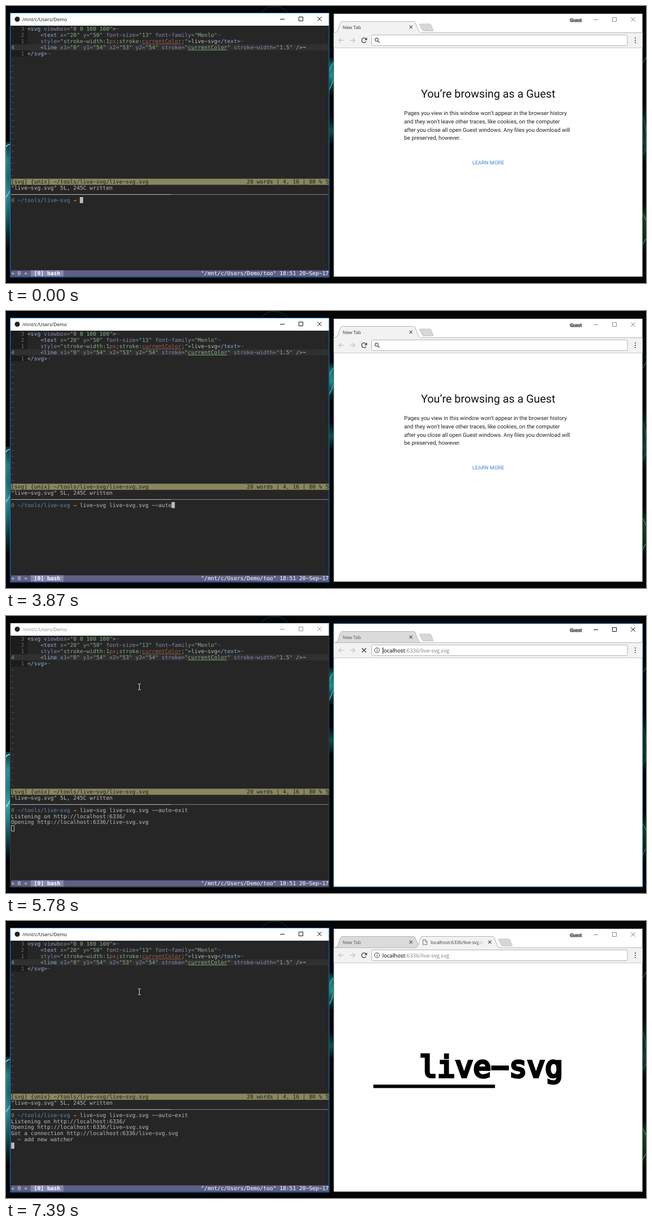
Recreate the animation shown at these times as an HTML page with a canvas. Size 1135x493 px, loop 8 s.

```html
<!DOCTYPE html>
<html lang="en">
<head>
<meta charset="utf-8">
<title>Terminal and browser</title>
<style>
html, body { margin: 0; width: 100%; height: 100%; overflow: hidden; background: #030506; }
canvas { display: block; }
</style>
</head>
<body>
<canvas id="stage" width="1135" height="493"></canvas>
<script>
const LOOP = 8000;
const ctx = document.getElementById('stage').getContext('2d');
const MONO = '"DejaVu Sans Mono", monospace';
const UI = '"Open Sans", sans-serif';
const ROBOTO = 'Roboto, sans-serif';
const WIDE_HYPHEN = '\u2212';

// ---------- drawing helpers ----------
function rect(x, y, w, h, color) {
  ctx.fillStyle = color;
  ctx.fillRect(x, y, w, h);
}
function label(text, x, y, font, color) {
  ctx.font = font;
  ctx.fillStyle = color;
  ctx.fillText(text, x, y);
}
function stroke(d, color, width = 1) {
  ctx.strokeStyle = color;
  ctx.lineWidth = width;
  ctx.stroke(new Path2D(d));
}
function shape(d, fill, line) {
  ctx.fillStyle = fill;
  ctx.fill(new Path2D(d));
  if (line) stroke(d, line);
}
function dot(x, y, r, color) {
  ctx.fillStyle = color;
  ctx.beginPath();
  ctx.arc(x, y, r, 0, 7);
  ctx.fill();
}
function arc(x, y, r, from, to, color, width) {
  ctx.strokeStyle = color;
  ctx.lineWidth = width;
  ctx.beginPath();
  ctx.arc(x, y, r, from, to);
  ctx.stroke();
}
function cross(x, y, r, color, width = 1) {
  stroke(`M${x - r} ${y - r}L${x + r} ${y + r}M${x + r} ${y - r}L${x - r} ${y + r}`, color, width);
}
function windowButtons(x, y, color) {
  stroke(`M${x - 4} ${y + .5}h8`, color);
  stroke(`M${x + 29.5} ${y - 3.5}h7v7h-7z`, color);
  cross(x + 66, y, 3.8, color);
}
function windowShadow(x, y, w, h, focused) {
  ctx.save();
  ctx.shadowColor = focused ? 'rgba(0,0,0,.6)' : 'rgba(0,0,0,.2)';
  ctx.shadowBlur = focused ? 14 : 6;
  ctx.shadowOffsetY = 2;
  rect(x, y, w, h, '#000');
  ctx.restore();
}

// ---------- desktop ----------
function verticalGlow(x, y, w, h, colors) {
  const glow = ctx.createLinearGradient(0, y, 0, y + h);
  colors.forEach((color, i) => glow.addColorStop(i / (colors.length - 1), color));
  rect(x, y, w, h, glow);
}
function drawWallpaper() {
  rect(0, 0, 1135, 493, '#030507');
  verticalGlow(0, 242, 8, 190, ['#0b3a41', '#2a929c', '#1f7d88', '#33a3ad', '#1c7580', '#0c3d45', '#04090b']);
  stroke('M-2 253Q4 244 10 247M-2 342Q5 335 10 322', '#8fe6ea', 2);
  stroke('M450 16Q462 -2 480 1T500 16', '#07262a', 1.5);
  verticalGlow(573, 92, 8, 66, ['#06201f', '#1f8f88', '#2bb3a8', '#0d4a47', '#04100f']);
  stroke('M570 130Q574 106 584 98M570 154Q578 142 584 120', '#45c9bd', 2);
  verticalGlow(573, 200, 8, 44, ['#04100f', '#14605a', '#04100f']);
  verticalGlow(1129, 170, 6, 110, ['#030507', '#0a2a18', '#12402a', '#030507']);
  stroke('M1127 105L1137 88M1127 190Q1133 205 1137 240M1127 270L1137 248', '#1d5a33', 1.5);
  verticalGlow(1129, 350, 6, 90, ['#030507', '#173f1a', '#0f2e14', '#030507']);
  stroke('M1127 365L1137 385M1127 430Q1133 415 1137 412', '#3f8a3f', 1.5);
}

// ---------- terminal ----------
const CELL = 5.807, ROW = 10.875, LEFT = 9, TOP = 35.5;
const FG = '#bcbcbc', BG = '#262626', TAG = '#8fafd7', ATTR = '#8787af', STR = '#87af87',
      RUST = '#a5624f', DIM = '#585858', INK = '#1c1c1c', OLIVE = '#87875f';
const colX = col => LEFT + col * CELL;
const rowY = row => TOP + row * ROW;

function cells(row, col, text, color, bold = '') {
  ctx.font = `${bold} 9.66px ${MONO}`;
  ctx.fillStyle = color;
  [...text.replaceAll('-', WIDE_HYPHEN)].forEach((ch, i) =>
    ctx.fillText(ch, colX(col + i), rowY(row) + 8.7));
}
function fillCells(row, col, count, color) {
  rect(colX(col), rowY(row), count * CELL, ROW, color);
}
function runs(row, col, parts) {
  for (const [color, text, underline] of parts) {
    cells(row, col, text, color);
    if (underline) rect(colX(col), rowY(row) + 10, text.length * CELL, .8, color);
    col += text.length;
  }
}
const attrs = text => text.split(/("[^"]*")/).map(s => [s[0] === '"' ? STR : ATTR, s]);

const CODE = [
  [[TAG, '<svg'], ...attrs(' viewbox="0 0 100 100"'), [TAG, '>'], [DIM, '¬']],
  [[TAG, '    <text'], ...attrs(' x="20" y="50" font-size="13" font-family="Menlo"'), [DIM, '¬']],
  [[ATTR, '    style='], [STR, '"stroke-width:1'], [RUST, 'px'], [STR, ';stroke:'],
   [RUST, 'currentColor', true], [STR, ';"'], [TAG, '>'], [FG, 'live-svg'], [TAG, '</text>'], [DIM, '¬']],
  [[TAG, '    <line'], ...attrs(' x1="0" y1="54" x2="53" y2="54" stroke='), [STR, '"'],
   [STR, 'currentColor', true], [STR, '"'], ...attrs(' stroke-width="1.5"'), [TAG, ' />'], [FG, '¬']],
  [[TAG, '</svg>'], [DIM, '¬']],
];
const COMMAND = 'live-svg live-svg.svg --auto-exit';
// [time in ms, characters typed]
const KEYS = [[690, 1], [770, 3], [850, 4], [1080, 5], [1180, 6], [1290, 7], [1460, 8], [1610, 9],
  [2160, 11], [2230, 12], [2390, 22], [3090, 23], [3170, 24], [3360, 25], [3500, 26], [3560, 27],
  [3870, 28], [4190, 29], [4340, 30], [4510, 31], [4580, 32], [4660, 33]];
const OUTPUT = [
  [5520, 'Listening on http://localhost:6336/'],
  [5520, 'Opening http://localhost:6336/live-svg.svg'],
  [6530, 'Got a connection http://localhost:6336/live-svg.svg'],
  [6530, '  - add new watcher'],
];

function drawEditor() {
  for (let row = 0; row < 5; row++) fillCells(row, 0, 5, INK);
  fillCells(3, 0, 97, '#303030');
  CODE.forEach((parts, row) => {
    if (row === 3) cells(row, 0, '4', '#5fafaf');
    else cells(row, 3, String(Math.abs(3 - row)), '#6c6c6c');
    runs(row, 5, parts);
  });
  for (let row = 5; row < 25; row++) cells(row, 0, '~', DIM);
  fillCells(25, 0, 97, OLIVE);
  cells(25, 0, '[svg] {unix} ~/tools/live-svg/live-svg.svg', INK);
  cells(25, 72, '20 words | 4, 16 | 80 % 5', INK);
  cells(26, 0, '"live-svg.svg" 5L, 245C written', FG);
}

function drawShell(t, focused) {
  rect(LEFT, 335, 284, 1, FG);
  rect(293, 335, 279, 1, '#808080');

  const typed = KEYS.reduce((n, [at, count]) => t >= at ? count : n, 0);
  runs(28, 0, [[OLIVE, '0 '], ['#5f87af', '~/tools/live-svg '], ['#ff8700', '→ '],
    [FG, COMMAND.slice(0, typed)]]);
  const lines = OUTPUT.filter(([at]) => t >= at);
  lines.forEach(([, text], i) => cells(29 + i, 0, text, FG));

  const entered = t >= 4810;
  const cursorRow = entered ? 29 + lines.length : 28;
  const cursorCol = entered ? 0 : 21 + typed;
  if (focused) fillCells(cursorRow, cursorCol, 1, FG);
  else stroke(`M${colX(cursorCol) + .5} ${rowY(cursorRow) + .5}h5v9.8h-5z`, FG);

  fillCells(40, 0, 97, '#5f5f87');
  fillCells(40, 6, 10, '#8787af');
  cells(40, 0, '» 0 »', '#e4e4e4');
  cells(40, 7, '[0] bash', '#ffffff', 'bold');
  cells(40, 58, '"/mnt/c/Users/Demo/too" 18:51 20-Sep-17', '#ffffff');
}

function drawTerminal(t, focused) {
  rect(7, 12, 566.5, 471, focused ? '#1a7fd0' : '#3a3f42');
  rect(8, 13, 564.5, 469, BG);
  rect(8, 13, 564.5, 22, '#fff');
  dot(20, 23.5, 4.5, '#24241f');
  label('/mnt/c/Users/Demo', 29, 27, `8.5px ${UI}`, focused ? '#111' : '#8c8c8c');
  windowButtons(490, 23, focused ? '#111' : '#999');
  drawEditor();
  drawShell(t, focused);
}

function drawPointer() {
  stroke('M234 120.5q2.5 0 2.5 1.5v8q0 1.5 -2.5 1.5M239 120.5q-2.5 0 -2.5 1.5M236.5 130q0 1.5 2.5 1.5', '#ddd');
}

// ---------- browser ----------
const ADDRESS = 'localhost:6336/live-svg.svg';

function drawTab(x, width, active) {
  const right = x + width;
  shape(`M${x - 1} 47.5Q${x + 2} 47 ${x + 3.5} 43L${x + 8} 30Q${x + 9} 27.5 ${x + 11} 27.5` +
    `H${right - 4}Q${right - 2} 27.5 ${right - 1} 30L${right + 4} 43Q${right + 5} 47 ${right + 8} 47.5`,
    active ? '#f2f2f2' : '#dadbda', '#b4b4b4');
}

function drawPageTab(t, step, width) {
  const x = 727;
  drawTab(x, width, true);
  rect(x + 1, 47, width + 6, 1.5, '#f2f2f2');
  if (width < 50) return;
  if (t < 6380) {
    const start = Math.PI - (step - 7) * .7;
    arc(743, 37.5, 4.2, start, start + Math.PI / 2, '#8a8a8a', 1.2);
  } else {
    shape('M739.5 33.5h4.5l2.5 2.5v6h-7z', '#fff', '#666');
    stroke('M743.5 33.5v3h3', '#666', .8);
  }
  const end = x + width - 19;
  const fade = ctx.createLinearGradient(end - 14, 0, end, 0);
  fade.addColorStop(0, '#333');
  fade.addColorStop(1, 'rgba(51,51,51,0)');
  label(ADDRESS, 753, 40.5, `8.2px ${UI}`, fade);
  cross(x + width - 9, 37.5, 2.6, '#444', 1.2);
}

function drawTabs(t, step) {
  const opened = t >= 5780;
  const growth = opened ? 140 * (1 - (1 - Math.min(1, step / 3)) ** 2) : 0;
  const bx = 733 + growth;
  shape(`M${bx + 1.5} 32H${bx + 18}Q${bx + 20} 32 ${bx + 21} 34L${bx + 25} 44.5H${bx + 8}` +
    `Q${bx + 6} 44.5 ${bx + 5} 42L${bx} 33Z`, '#d6d8d7', '#c2c4c3');
  drawTab(585, 142, !opened);
  label('New Tab', 597, 40.5, `8.2px ${UI}`, opened ? '#555' : '#333');
  cross(718, 37.5, 2.6, '#555', 1.2);
  rect(581.5, 47, 547, 27, '#f2f2f2');
  rect(581.5, 47, opened ? 547 : 3, 1, '#b4b4b4');
  if (!opened) rect(735, 47, 394, 1, '#b4b4b4');
  if (growth > 20) drawPageTab(t, step, growth);
}

function drawToolbar(t) {
  rect(581.5, 74, 547, 1, '#c9c9c9');
  stroke('M599 61H590M594 57l-4 4l4 4M610 61h9M615 57l4 4l-4 4', '#c6c6c6', 1.3);
  const loading = t >= 5780 && t < 6700;
  if (loading) cross(635, 61, 3.8, '#444', 1.5);
  else {
    arc(635, 61, 4.2, .5, 5.5, '#444', 1.4);
    shape('M640.3 56v4.7h-4.7z', '#444');
  }
  ctx.beginPath();
  ctx.roundRect(648.5, 51.5, 453.5, 19, 2);
  ctx.fillStyle = '#fff';
  ctx.fill();
  ctx.strokeStyle = '#b3b3b3';
  ctx.lineWidth = 1;
  ctx.stroke();
  for (const y of [57, 61, 65]) dot(1116, y, 1.1, '#444');

  if (t < 5780) {
    arc(657.3, 60, 2.8, 0, 7, '#555', 1.2);
    stroke('M659.4 62.2L662.5 65.3', '#555', 1.4);
    return;
  }
  arc(658, 61, 4.4, 0, 7, '#444', 1);
  rect(657.5, 60, 1.1, 3.5, '#444');
  rect(657.5, 58, 1.1, 1.1, '#444');
  const font = `9.65px ${UI}`;
  label(ADDRESS, 667.5, 64.5, font, '#808080');
  label('localhost', 667.5, 64.5, font, '#303030');
  if (t < 5850) rect(668, 56, 1, 11, '#111');
}

function drawGuestPage() {
  label('You’re browsing as a Guest', 736, 163, `19.8px ${ROBOTO}`, '#111');
  ['Pages you view in this window won’t appear in the browser history',
   'and they won’t leave other traces, like cookies, on the computer',
   'after you close all open Guest windows. Any files you download will',
   'be preserved, however.'
  ].forEach((line, i) => label(line, 706, 194.3 + i * 14.6, `9.89px ${ROBOTO}`, '#222'));
  label('LEARN MORE', 827, 282, `9.3px ${ROBOTO}`, '#3d86dc');
}

function drawSvgPage() {
  const word = `live${WIDE_HYPHEN}svg`;
  ctx.save();
  ctx.translate(651.5, 74.5);
  ctx.scale(4.07, 4.07);
  ctx.font = `13px ${MONO}`;
  ctx.fillStyle = ctx.strokeStyle = '#000';
  ctx.lineWidth = 1;
  ctx.miterLimit = 4;
  ctx.fillText(word, 20, 50);
  ctx.strokeText(word, 20, 50);
  ctx.fillRect(0, 53.25, 53, 1.5);
  ctx.restore();
}

function drawStatusBubble(t) {
  const left = [6700, 6770, 6850].filter(at => t >= at).length;
  ctx.save();
  ctx.globalAlpha = 1 - left / 3;
  shape('M581.5 466H760q2.5 0 2.5 2.5V481.5H581.5z', '#f2f2f2', '#d4d4d4');
  label('Waiting for localhost...', 583, 477.3, `8.3px ${UI}`, '#555');
  ctx.restore();
}

function drawBrowser(t, focused) {
  const step = Math.floor((t - 5770) / 75);
  rect(580.5, 13, 549, 469.5, focused ? '#1a7fd0' : '#34383a');
  rect(581.5, 14, 547, 467.5, '#fff');
  ctx.font = `7.7px ${UI}`;
  ctx.strokeStyle = '#aaa';
  ctx.lineWidth = 2;
  ctx.strokeText('Guest', 1000, 27.5);
  label('Guest', 1000, 27.5, ctx.font, '#222');
  windowButtons(1046, 24, focused ? '#111' : '#888');
  drawTabs(t, step);
  drawToolbar(t);
  if (t < 5780) drawGuestPage();
  if (t >= 6295) drawSvgPage();
  if (t >= 6220) drawStatusBubble(t);
}

// ---------- timeline ----------
function draw(t) {
  const terminalFocus = t < 5780 || t >= 7390;
  const browserFocus = t >= 5780 && t < 7320;
  ctx.textRendering = 'geometricPrecision';
  drawWallpaper();
  windowShadow(8, 13, 565, 469, terminalFocus);
  windowShadow(581, 13, 548, 469, browserFocus);
  drawTerminal(t, terminalFocus);
  drawBrowser(t, browserFocus);
  if (t >= 5780) drawPointer();
}

const begin = performance.now();
function tick() {
  draw((performance.now() - begin) % LOOP);
  requestAnimationFrame(tick);
}
tick();
</script>
</body>
</html>
```
